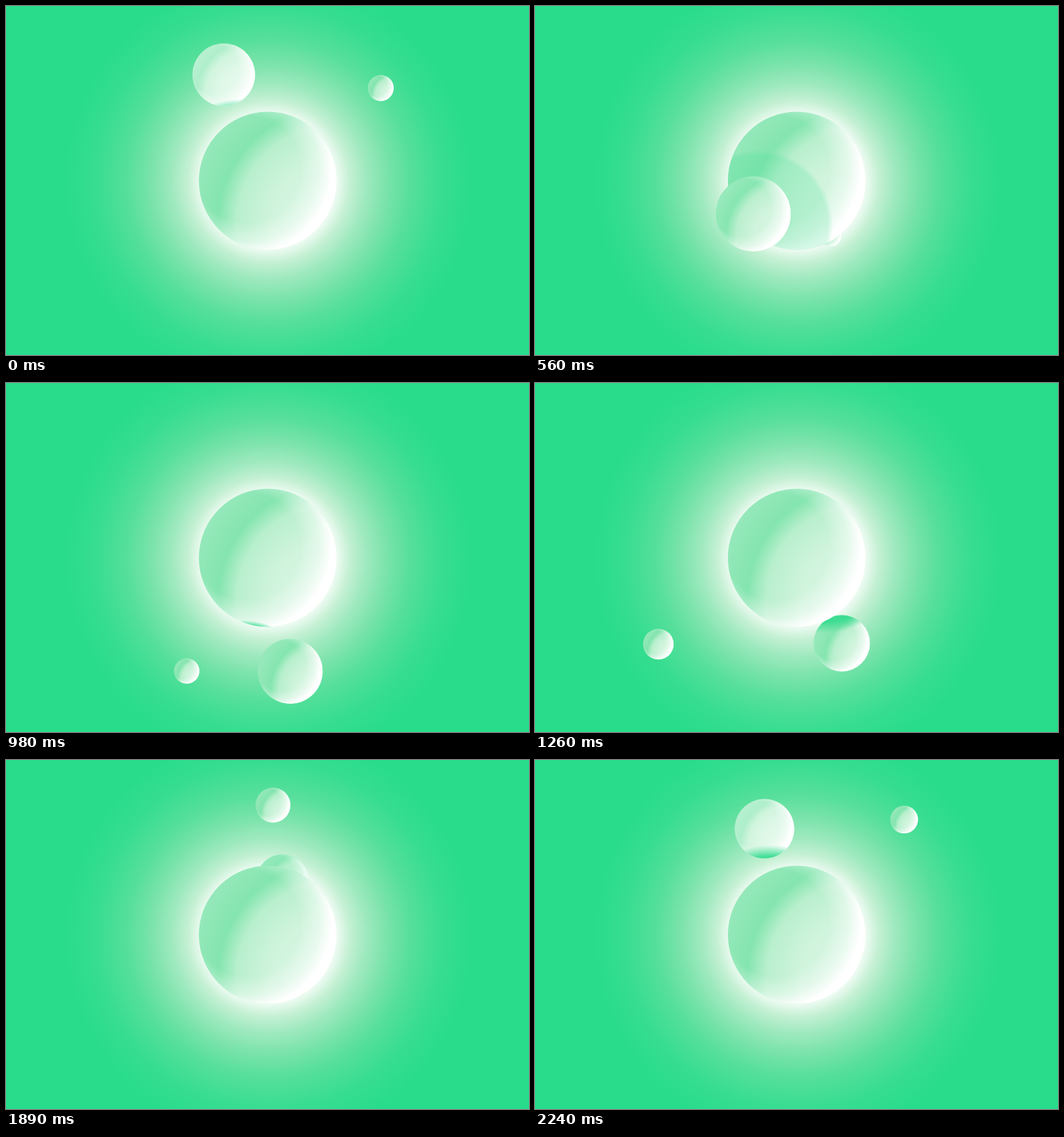
Recreate the animation shown at these times as an HTML page with a canvas. Size 800 by 533 pixels, loop 2310 ms.

```html
<!DOCTYPE html>
<html lang="en">
<head>
<meta charset="utf-8">
<title>Orbiting moons</title>
<style>
  html, body { margin: 0; width: 100%; height: 100%; overflow: hidden; background: #29dc8b; }
  canvas { display: block; width: 100vw; height: 100vh; }
</style>
</head>
<body>
<canvas width="800" height="533"></canvas>
<script>
const ctx = document.querySelector('canvas').getContext('2d');
const CX = 400, CY = 267, R = 105.5, STEP = 70, COUNT = 33;

// Orbit phase in degrees at chosen steps; linear in between.
const phases = [[0, 0], [8, 86], [14, 150.7], [18, 193.5], [23, 245.3], [27, 288], [32, 345], [33, 360]];

// Each row is [constant, cos, sin]; x and y are in moon radii, depth is 1 / radius.
const bigMoon = { x: [0, -1.4, -1.06], y: [0, -3.386, 1.12], depth: [.0216, -.0007, -.0041] };
const smallMoon = { x: [0, 8.71, 2.5], y: [0, -7.13, 5.5], depth: [.0479, .0024, .0117] };

function phaseAt(step) {
  const i = phases.findIndex(p => p[0] > step);
  const [s0, a0] = phases[i - 1], [s1, a1] = phases[i];
  return (a0 + (a1 - a0) * (step - s0) / (s1 - s0)) * Math.PI / 180;
}

function place(moon, angle) {
  const at = ([k, c, s]) => k + c * Math.cos(angle) + s * Math.sin(angle);
  const r = 1 / at(moon.depth);
  return { x: CX + at(moon.x) * r, y: CY + at(moon.y) * r, r };
}

function radial(x, y, r, stops) {
  const g = ctx.createRadialGradient(x, y, 0, x, y, r);
  stops.forEach(([at, color]) => g.addColorStop(at, color));
  return g;
}

function disc({ x, y, r }, fill) {
  ctx.beginPath();
  ctx.arc(x, y, r, 0, 2 * Math.PI);
  ctx.fillStyle = fill;
  ctx.fill();
}

// light runs from -1 to 1: it moves the dark edge and whitens the ball.
function ball(b, light = 0) {
  const { x, y, r } = b;
  disc(b, radial(x + (.94 - .12 * light) * r, y + .6 * r, 2.1 * r, [
    [0, '#e0f8e9'], [.43, '#cff4dc'], [.66, '#b8efcd'], [.79, '#84e5af'], [1, '#95e8ba']
  ]));
  disc(b, `rgba(255,255,255,${.35 * Math.max(0, light)})`);
  disc(b, radial(x - .3 * r, y - .17 * r, 1.28 * r, [
    [0, 'rgba(255,255,255,0)'], [.6, 'rgba(255,255,255,0)'],
    [.82, 'rgba(255,255,255,.45)'], [.96, '#fff'], [1, '#fff']
  ]));
}

// Soft shadow falling on a ball from a disc at x, y.
function shade(b, x, y, r, solid, alpha) {
  ctx.globalAlpha = alpha;
  disc(b, radial(x, y, r, [[0, '#38dc90'], [solid, '#38dc90'], [1, 'rgba(56,220,144,0)']]));
  ctx.globalAlpha = 1;
}

function draw(step) {
  const angle = phaseAt(step), cos = Math.cos(angle), sin = Math.sin(angle);
  const planet = { x: CX + .5, y: CY, r: R };
  const big = place(bigMoon, angle), small = place(smallMoon, angle);
  const bigInFront = sin > 0;

  ctx.fillStyle = '#29dc8b';
  ctx.fillRect(0, 0, 800, 533);
  disc({ x: CX + 2, y: CY + 1, r: 310 }, radial(CX + 2, CY + 1, 310, [
    [0, '#fff'], [.34, '#ebfaf0'], [.4, '#c4f0d3'], [.48, '#9fe9bf'], [.58, '#7be3ab'],
    [.7, '#56df9b'], [.85, '#38dd91'], [1, '#29dc8b']
  ]));

  const drawBig = () => {
    ball(big, cos);
    if (!bigInFront) shade(big, CX - 40 * cos, CY + 15 * cos + 45 * sin, 140, .88, cos * cos);
  };
  const drawPlanet = () => {
    ball(planet);
    if (bigInFront) {
      const x = big.x + 81 * cos + 2 * sin, y = big.y - 14 * cos + 18 * sin;
      shade(planet, x, y, 2 * big.r, .93, .2 + .8 * cos * cos);
    }
  };

  if (bigInFront) {
    ball(small);
    drawPlanet();
    drawBig();
  } else {
    drawBig();
    drawPlanet();
    ball(small);
  }
}

const start = performance.now();
function tick() {
  draw(Math.floor((performance.now() - start) / STEP) % COUNT);
  requestAnimationFrame(tick);
}
tick();
</script>
</body>
</html>
```
